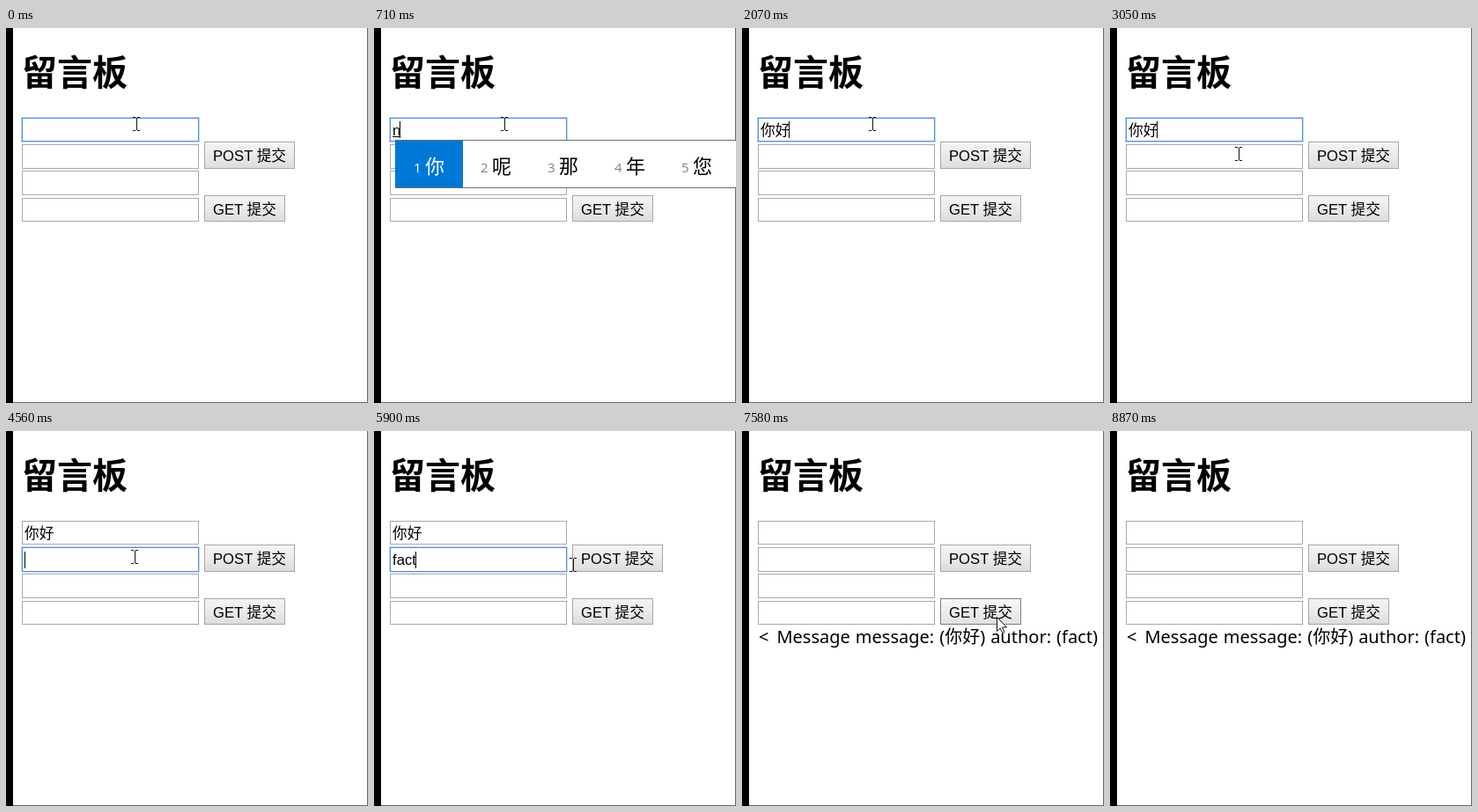
Recreate the animation shown at these times as an HTML page. Size 411 by 426 pixels, loop 9020 ms.

```html
<!DOCTYPE html>
<html lang="zh-CN">
<head>
<meta charset="utf-8">
<title>留言板</title>
<style>
  html, body { margin: 0; width: 100%; height: 100%; overflow: hidden; background: #fff; }
  svg { display: block; width: 411px; height: 426px; }
  rect { shape-rendering: crispEdges; }
  text { white-space: pre; }
  h1 { margin: 0; }
  .title { font: bold 40px "Noto Sans CJK SC", "Noto Sans CJK JP", "Noto Sans CJK", sans-serif; }
  .ui { font: 16.67px "Liberation Sans", "Noto Sans CJK SC", "Noto Sans CJK JP", "Noto Sans CJK", sans-serif; }
  .msg { font: 20px "Noto Sans", "Noto Sans CJK SC", "Noto Sans CJK JP", "Noto Sans CJK", sans-serif; word-spacing: .8px; }
  .han { font: 22px "Noto Sans CJK SC", "Noto Sans CJK JP", "Noto Sans CJK", sans-serif; }
  .num { font: 15px "Open Sans", sans-serif; fill: #808080; }
  .on { fill: #fff; }
  .field { fill: #fff; stroke: #a9a9a9; }
  .ring { fill: none; stroke: #4d90fe; opacity: .38; }
  .focus .field { stroke: #5b8fdc; }
  .field + .ring { visibility: hidden; }
  .focus .ring { visibility: visible; }
  .button rect { fill: url(#face); stroke: #a6a6a6; }
  .button.hover rect { fill: url(#lit); stroke: #7d7d7d; }
  .button.press rect { fill: url(#down); stroke: #7d7d7d; }
</style>
</head>
<body>
<svg viewBox="0 0 411 426">
  <defs>
    <linearGradient id="face" x2="0" y2="1"><stop stop-color="#f4f4f4"/><stop offset=".4" stop-color="#ededed"/><stop offset="1" stop-color="#dcdcdc"/></linearGradient>
    <linearGradient id="lit" x2="0" y2="1"><stop stop-color="#f7f7f7"/><stop offset=".4" stop-color="#f0f0f0"/><stop offset="1" stop-color="#e0e0e0"/></linearGradient>
    <linearGradient id="down" x2="0" y2="1"><stop stop-color="#dcdcdc"/><stop offset="1" stop-color="#eeeeee"/></linearGradient>
  </defs>
  <rect width="411" height="426" fill="#fff"/>
  <rect width="8" height="426"/>
  <rect x="410" width="1" height="426" fill="#666"/>
  <rect x="8" y="425" width="403" height="1" fill="#666"/>
  <text class="title" x="18" y="65">留言板</text>
  <g id="fields"></g>
  <g id="buttons"></g>
  <text id="reply" class="msg" x="19" y="241">&lt;<tspan dx="3"> Message message: (你好) author: (fact)</tspan></text>
  <rect id="underline" x="21" y="123" height="1"/>
  <rect id="caret" width="1" height="19"/>
  <g id="popup"></g>
  <path id="beam" d="M-4 .5h3m2 0h3M-4 15.5h3m2 0h3M.5 1v14" fill="none" stroke="#111"/>
  <path id="arrow" d="M.5 .5V16.5L4.2 13L6.8 18.5L9 17.5L6.5 12H11.5Z" fill="#fff" stroke="#111"/>
</svg>
<script>
const LOOP = 9020;
const TEXT_X = 21;
const $ = id => document.getElementById(id);

// Each step keeps the values of the one before it.
const start = {
  a: '', b: '', focus: 0, caret: false, compose: false, popup: null,
  beam: [148, 101], arrow: null, post: '', get: '', reply: false
};
const one = [24, '你', '呢', '那', '年', '您'];
const two = [29, '你', '呢', '尼', '泥', '拟'];
const pair = [40, '你好', '你会', '你还', '你和'];
const changes = [
  [0, {}],
  [130, { caret: true }],
  [710, { a: 'n', compose: true, popup: one }],
  [1140, { a: 'ni', popup: two }],
  [1670, { a: "ni'h" }],
  [1790, { popup: pair }],
  [2070, { a: '你好', compose: false, popup: null }],
  [2510, { caret: false }],
  [2790, { beam: [154, 109] }],
  [2920, { beam: [150, 126] }],
  [3050, { beam: [146, 135], caret: true }],
  [3480, { focus: 1 }],
  [4010, { caret: false }],
  [4560, { caret: true }],
  [4960, { b: 'f' }],
  [5210, { b: 'fa' }],
  [5500, { b: 'fac' }],
  [5750, { b: 'fact', beam: [176, 139] }],
  [5900, { beam: [226, 144] }],
  [6050, { beam: null, arrow: [272, 156], post: 'hover' }],
  [6200, { arrow: [323, 171], post: '' }],
  [6330, { arrow: [306, 157], post: 'hover' }],
  [6470, { arrow: [292, 149], post: 'press', focus: -1, caret: false }],
  [6590, { post: 'hover' }],
  [7030, { a: '', b: '', post: '', reply: true }],
  [7450, { arrow: [291, 180] }],
  [7580, { arrow: [289, 211], get: 'hover' }],
  [7730, { arrow: [288, 234], get: '' }],
  [7880, { arrow: [286, 247] }],
  [8290, { arrow: [300, 288] }],
  [8440, { arrow: [318, 326] }],
  [8580, { arrow: [336, 364] }],
  [8730, { arrow: [357, 402] }],
  [8870, { arrow: null }]
];
let last = start;
const steps = changes.map(([at, change]) => ({ at, s: last = { ...last, ...change } }));

const box = (x, y, w, h, cls) =>
  `<rect class="${cls}" x="${x + .5}" y="${y + .5}" width="${w - 1}" height="${h - 1}"/>`;

$('fields').innerHTML = [[102, 27], [132, 28], [162, 28], [193, 27]].map(([y, h]) =>
  `<g>${box(18, y, 201, h, 'field')}${box(17, y - 1, 203, h + 2, 'ring')}` +
  `<text class="ui" x="${TEXT_X}" y="${y + 20}"></text></g>`).join('');

$('buttons').innerHTML = [['POST', 129, 103, 31], ['GET', 190, 92, 30]].map(([name, y, w, h]) =>
  `<g class="button">${box(225, y, w, h, '')}<text class="ui" x="235" y="${y + 22}">${name} 提交</text></g>`).join('');

const fields = [...$('fields').children];
const buttons = [...$('buttons').children];

function candidates([x, ...words]) {
  const pitch = 54 + 22 * words[0].length;
  const bars = `<rect x="${x}" y="127" width="${411 - x}" height="55" fill="#6b6b6b"/>` +
    `<rect x="${x + 1}" y="128" width="${410 - x}" height="53" fill="#fff"/>` +
    `<rect x="${x}" y="128" width="${pitch + 1}" height="53" fill="#0078d7"/>`;
  return bars + words.map((word, i) => {
    const left = x + 21 + i * pitch, on = i ? '' : ' on';
    return `<text class="num${on}" x="${left}" y="164">${i + 1}</text>` +
      `<text class="han${on}" x="${left + 13}" y="165">${word}</text>`;
  }).join('');
}

function show(el, visible) {
  el.style.visibility = visible ? 'visible' : 'hidden';
}

function place(el, pos) {
  show(el, pos);
  if (pos) el.setAttribute('transform', `translate(${pos})`);
}

function draw(s) {
  fields.forEach((f, i) => {
    f.setAttribute('class', i === s.focus ? 'focus' : '');
    f.lastChild.textContent = [s.a, s.b][i] || '';
  });
  [s.post, s.get].forEach((state, i) => buttons[i].setAttribute('class', 'button ' + state));

  const value = [s.a, s.b][s.focus];
  const width = value ? fields[s.focus].lastChild.getComputedTextLength() : 0;
  show($('caret'), s.caret);
  $('caret').setAttribute('x', Math.floor(TEXT_X + width - (width ? .8 : 0)));
  $('caret').setAttribute('y', s.focus === 1 ? 137 : 106);
  show($('underline'), s.compose);
  $('underline').setAttribute('width', Math.round(width));

  $('popup').innerHTML = s.popup ? candidates(s.popup) : '';
  show($('reply'), s.reply);
  place($('beam'), s.beam);
  place($('arrow'), s.arrow);
}

const begin = performance.now();
let shown = null;
function tick() {
  const t = (performance.now() - begin) % LOOP;
  const step = steps.filter(k => k.at <= t).pop();
  if (step !== shown) draw((shown = step).s);
  requestAnimationFrame(tick);
}
tick();
</script>
</body>
</html>
```
